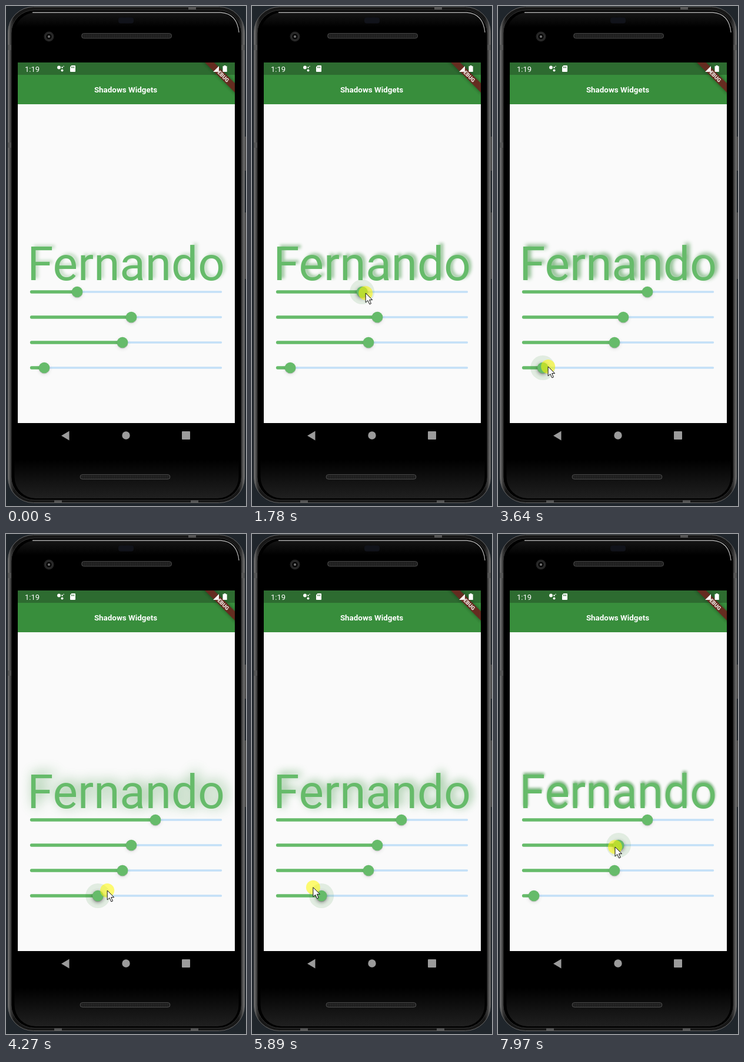
Animation, 408 px wide and 850 px high, one loop 8000 ms. Source, as an HTML page:

```html
<!DOCTYPE html>
<html lang="en">
<head>
<meta charset="utf-8">
<title>Shadows Widgets</title>
<style>
html, body { margin: 0; width: 100%; height: 100%; overflow: hidden; background: #20262c; }
svg { display: block; width: 408px; height: 850px; font-family: Roboto, sans-serif; }
.word { font-size: 80px; text-anchor: middle; }
</style>
</head>
<body>
<svg viewBox="0 0 408 850">
  <defs>
    <linearGradient id="edge" x2="1" y2="0">
      <stop offset="0" stop-color="#777"/><stop offset=".012" stop-color="#3a3a3a"/>
      <stop offset=".025" stop-color="#171717"/><stop offset=".975" stop-color="#171717"/>
      <stop offset=".988" stop-color="#3a3a3a"/><stop offset="1" stop-color="#777"/>
    </linearGradient>
    <linearGradient id="face" x2="0" y2="1">
      <stop offset="0" stop-color="#161616"/><stop offset=".03" stop-color="#000"/>
      <stop offset=".92" stop-color="#000"/><stop offset="1" stop-color="#202020"/>
    </linearGradient>
    <pattern id="mesh" width="3" height="3" patternUnits="userSpaceOnUse">
      <rect width="3" height="3" fill="#1b1b1b"/><circle cx="1.5" cy="1.5" r=".8" fill="#3b3b3b"/>
    </pattern>
    <clipPath id="screen"><rect x="20" y="96" width="369" height="613"/></clipPath>
    <filter id="soft" x="-50%" y="-50%" width="200%" height="200%"><feGaussianBlur stdDeviation="3"/></filter>
  </defs>

  <!-- phone body -->
  <path d="M404 222h4v58h-4zM404 351h4v113h-4z" fill="#4a4a4a"/>
  <rect x="3.5" y="1.5" width="402" height="843" rx="43" fill="url(#edge)" stroke="#666"/>
  <path d="M3 66h6v9H3zM3 232h6v9H3zM400 66h6v9h-6zM310 1h13v5h-13zM82 840h13v4H82zM314 840h13v4h-13z" fill="#565656"/>
  <rect x="9" y="7" width="391" height="833" rx="39" fill="#000" stroke="#333"/>
  <rect x="14.5" y="11" width="381" height="826" rx="36" fill="url(#face)"/>
  <path d="M45 11H365Q393 13 396 45" fill="none" stroke="#aaa" stroke-width="1.3"/>
  <rect x="191" y="19.5" width="26" height="10" rx="4" fill="#11131a"/>
  <circle cx="73" cy="52" r="8.5" fill="#252525"/>
  <circle cx="73" cy="52" r="5.5" fill="#090909" stroke="#3b3b3b"/>
  <circle cx="73" cy="52" r="2" fill="#777"/>
  <g fill="url(#mesh)" stroke="#484848">
    <rect x="128.5" y="46.5" width="153" height="8.5" rx="4"/>
    <rect x="126" y="796.5" width="153" height="8" rx="4"/>
  </g>
  <g fill="#9b9b9b">
    <path d="M94 730.5L107.500 722.500V738.500Z"/>
    <circle cx="204" cy="730" r="6.7"/>
    <rect x="299" y="723" width="14" height="14" rx="1"/>
  </g>

  <g clip-path="url(#screen)">
    <path d="M20 167h369v542H20z" fill="#fafafa"/>
    <text id="shadow" class="word" x="204" y="466" fill="#388e3c">Fernando</text>
    <text class="word" x="204" y="466" fill="#66bb6a">Fernando</text>
    <g id="sliders"></g>

    <path d="M20 117h369v50H20z" fill="#388e3c"/>
    <path d="M20 96h369v21H20z" fill="#2d6b30"/>
    <text x="203.500" y="147" font-size="13.400" font-weight="700" text-anchor="middle" fill="#fff">Shadows Widgets</text>
    <text x="32" y="111.500" font-size="13" fill="#fff">1:19</text>
    <g fill="#fff">
      <circle cx="90" cy="104.500" r="2.900"/><circle cx="95.500" cy="109.500" r="2"/>
      <circle cx="95.500" cy="104.500" r="1.300"/><circle cx="98" cy="102.500" r=".8"/>
      <path d="M111.500 101H117q1 0 1 1v9q0 1-1 1h-7q-1 0-1-1v-7.500z"/>
    </g>
    <path d="M111.500 103v2.500M113.500 103v2.500M115.500 103v2.500" stroke="#2d6b30"/>
    <g transform="translate(389 96) rotate(45)">
      <rect x="-42" y="25" width="84" height="11" fill="#000" opacity=".4" filter="url(#soft)"/>
      <rect x="-42" y="25" width="84" height="11" fill="#652c20"/>
    </g>
    <path d="M352 112L362 102V112ZM370.500 101h3v1.200h2.200v9.800h-7.200v-9.800h2z" fill="#fff"/>
    <text transform="translate(389 96) rotate(45)" y="33.800" font-size="9.200" font-weight="900" text-anchor="middle" fill="#f2e9e6">DEBUG</text>
  </g>

  <g id="pointer">
    <circle r="12" fill="#fffa00" opacity=".55"/>
    <path d="M0 0V16L3.800 12.600 6.700 19 9.300 17.900 6.500 11.600H11.500Z" fill="#fff" stroke="#111"/>
  </g>
</svg>

<script>
const LOOP = 8000, LEFT = 41, RIGHT = 367;
const $ = id => document.getElementById(id);

// Each key is [time, value, ...]
const sliders = [
  { y: 486, press: [1210, 2550], keys: [[1210, 121], [1270, 99], [1780, 187], [1980, 215], [2350, 254]] },
  { y: 529, press: [7600, 9000], keys: [[7850, 213], [7970, 205]] },
  { y: 572, press: [9000, 9000], keys: [[0, 198]] },
  { y: 615, press: [3280, 7150], keys: [[3300, 65], [3350, 73], [3500, 73], [3640, 76], [4270, 156],
    [4880, 268], [5190, 244], [6170, 68], [6450, 61]] }
];
const path = [[150, 217, 678], [400, 160, 575], [550, 130, 528], [720, 92, 478], [880, 99, 488],
  [1210, 99, 488], [1780, 193, 488], [1980, 225, 489], [2300, 254, 490], [2550, 254, 490],
  [2810, 235, 499], [3250, 73, 614], [3500, 75, 614], [3640, 85, 613], [4270, 172, 606],
  [4850, 272, 604], [5190, 231, 603], [6100, 66, 600], [6400, 59, 599], [6650, 59, 599],
  [6930, 62, 598], [7130, 62, 598], [7600, 211, 531], [7850, 211, 531], [7970, 199, 532]];

function at(keys, t) {
  const next = keys.findIndex(k => k[0] > t);
  if (next === 0) return keys[0].slice(1);
  if (next < 0) return keys[keys.length - 1].slice(1);
  const a = keys[next - 1], b = keys[next], p = (t - a[0]) / (b[0] - a[0]);
  return a.slice(1).map((v, i) => v + (b[i + 1] - v) * p);
}
const clamp = v => Math.max(0, Math.min(1, v));

$('sliders').innerHTML = sliders.map(({ y }) => `<g transform="translate(0 ${y})" stroke-linecap="round">
  <path d="M43 0H365.500" stroke="#c3e0f7" stroke-width="3.500"/>
  <path class="fill" stroke="#66bb6a" stroke-width="5.300"/>
  <g class="thumb">
    <circle class="halo" r="21" fill="#388e3c" opacity=".13"/>
    <circle class="drop" cy="2" r="9.500" filter="url(#soft)"/>
    <circle cy="1" r="9.500" fill="#000" opacity=".15"/>
    <circle r="9.300" fill="#66bb6a"/>
  </g></g>`).join('');
sliders.forEach((s, i) => {
  const row = $('sliders').children[i];
  for (const name of ['fill', 'thumb', 'halo', 'drop']) s[name] = row.querySelector('.' + name);
});

function draw(t) {
  const [alpha, dx, dy, blur] = sliders.map(s => {
    const [x] = at(s.keys, t);
    const held = clamp((t - s.press[0]) / 150) * clamp((s.press[1] + 150 - t) / 150);
    s.fill.setAttribute('d', `M43.500 0H${x}`);
    s.thumb.setAttribute('transform', `translate(${x} 0)`);
    s.halo.setAttribute('transform', `scale(${held})`);
    s.drop.setAttribute('opacity', 0.1 + 0.3 * held);
    return (x - LEFT) / (RIGHT - LEFT);
  });
  const shadow = $('shadow');
  shadow.setAttribute('transform', `translate(${(dx - 0.5) * 180} ${(dy - 0.5) * 180})`);
  shadow.setAttribute('opacity', alpha);
  shadow.style.filter = `blur(${blur * 29 + 0.5}px)`;

  $('pointer').setAttribute('transform', `translate(${at(path, t)})`);
  $('pointer').setAttribute('visibility', t < 120 ? 'hidden' : 'visible');
}

function frame() {
  draw(performance.now() % LOOP);
  requestAnimationFrame(frame);
}
frame();
</script>
</body>
</html>
```
